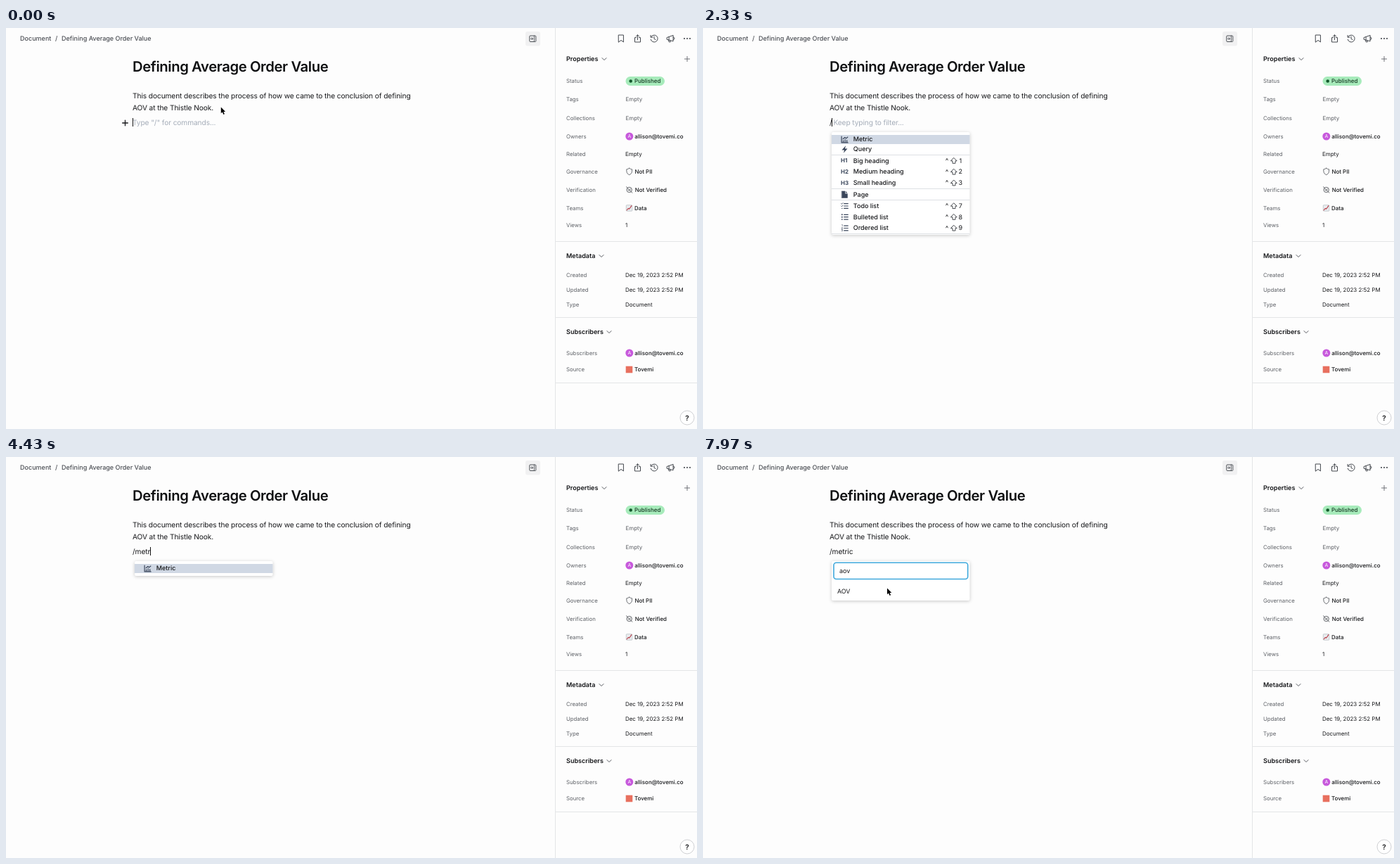
An HTML page with a canvas for the animation above (8 s loop, 983x570 px).

```html
<!DOCTYPE html>
<html lang="en">
<head>
<meta charset="utf-8">
<title>Document editor</title>
<style>
  html, body { margin: 0; width: 100%; height: 100%; overflow: hidden; background: #fdfdfd; }
  canvas { display: block; width: 983px; height: 570px; }
</style>
</head>
<body>
<canvas id="stage"></canvas>
<script>
const W = 983, H = 570, LOOP = 8000;
const canvas = document.getElementById('stage');
const ratio = window.devicePixelRatio || 1;
canvas.width = W * ratio;
canvas.height = H * ratio;
const ctx = canvas.getContext('2d');

const INK = '#17181b', GREY = '#5d6066', FAINT = '#a5adb9', ICON = '#39455a', LINE = '#e4e5e7';
const BODY = 10.2, BODY_GAP = -0.105;
const EMAIL = 'allison@tovemi.co';

// Drawing helpers

// y is the middle of the capital letters
function text(s, x, y, size, { weight = 400, color = INK, gap = 0, align = 'left' } = {}) {
  ctx.font = `${weight} ${size}px Inter, sans-serif`;
  ctx.textRendering = 'geometricPrecision';
  ctx.letterSpacing = gap + 'px';
  ctx.textAlign = align;
  ctx.fillStyle = color;
  ctx.fillText(s, x, y + size * 0.33);
  return ctx.measureText(s).width;
}

const body = (s, x, y, color) => text(s, x, y, BODY, { gap: BODY_GAP, color });

function rect(x, y, w, h, color) {
  ctx.fillStyle = color;
  ctx.fillRect(x, y, w, h);
}

function round(x, y, w, h, r, fill, stroke, width = 1) {
  ctx.beginPath();
  ctx.roundRect(x, y, w, h, r);
  paint(fill, stroke, width);
}

function disc(x, y, r, fill, stroke, width = 1) {
  ctx.beginPath();
  ctx.arc(x, y, r, 0, Math.PI * 2);
  paint(fill, stroke, width);
}

function paint(fill, stroke, width) {
  if (fill) { ctx.fillStyle = fill; ctx.fill(); }
  if (stroke) { ctx.strokeStyle = stroke; ctx.lineWidth = width; ctx.stroke(); }
}

// Path data relative to (x, y)
function path(x, y, d, { fill, stroke, width = 1 } = {}) {
  ctx.save();
  ctx.translate(x, y);
  ctx.lineCap = ctx.lineJoin = 'round';
  const p = new Path2D(d);
  if (stroke) { ctx.strokeStyle = stroke; ctx.lineWidth = width; ctx.stroke(p); }
  if (fill) { ctx.fillStyle = fill; ctx.fill(p); }
  ctx.restore();
}

// Sidebar

function heading(s, y, chevronX) {
  text(s, 797, y, 9.05, { weight: 600 });
  path(chevronX, y, 'M-3 -1.4L0 1.6L3 -1.4', { stroke: '#55585e' });
}

const label = (s, y) => text(s, 797, y, 7.8, { color: GREY });
const value = (s, x, y, weight = 400, color = INK) => text(s, x, y, 7.95, { weight, color });

function person(y) {
  disc(886.8, y, 5.5, '#c759dc');
  text('A', 886.8, y, 6.8, { color: '#fff', align: 'center' });
  value(EMAIL, 894.3, y, 500);
}

function toolbar() {
  round(739, 5, 21, 20.5, 3, '#f1f1f2');
  round(744.8, 11, 9, 8.5, 1, null, '#4c5056');
  path(749, 15, 'M2.4 -4V4.4M-2.6 .2H.4M-1 -1.4L.6 .2L-1 1.8', { stroke: '#4c5056', width: 0.9 });

  const pen = { stroke: '#43474d' };
  path(875, 15, 'M-3.4 -5H3.4V5L0 2.4L-3.4 5Z', pen);
  path(898.5, 15, 'M-2 -1.4H-4V5H4V-1.4H2M0 1.8V-5M-2.2 -3L0 -5.2L2.2 -3', pen);
  path(922, 15, 'M-4.4 -2.2A5 5 0 1 1 -4.8 1.2M-4.9 -4.6V-1.8H-2.1M0 -2.8V.4L2.2 1.6', pen);
  path(945.5, 15, 'M-5 -1.6L3.6 -4.6V3.8L-5 1.4ZM-3.2 2L-2.4 4.8H-.2L-.8 2.7M3.6 -2A1.8 1.8 0 0 1 3.6 1.6M-2.4 -2.4V2', pen);
  [-4, 0, 4].forEach(dx => disc(969 + dx, 15, 1.05, '#43474d'));
}

function sidebar() {
  rect(781, 0, 1, H, LINE);
  [303, 411, 504].forEach(y => rect(782, y, W - 782, 1, LINE));
  toolbar();

  heading('Properties', 44, 851);
  path(969, 44, 'M-3.6 0H3.6M0 -3.6V3.6', { stroke: '#62656b', width: 0.9 });
  const names = 'Status Tags Collections Owners Related Governance Verification Teams Views'.split(' ');
  const rows = [75.5, 101.5, 128, 154, 179, 204, 230, 256, 280];
  names.forEach((s, i) => label(s, rows[i]));

  round(881.5, 69, 55.5, 13, 6.5, '#a7ebbb');
  disc(888.7, 75.5, 2.3, '#14592c');
  value('Published', 894, 75.5, 500, '#173a24');
  value('Empty', 881.5, 101.5, 400, GREY);
  value('Empty', 881.5, 128, 400, GREY);
  person(154);
  value('Empty', 881, 179);
  path(886.7, 204, 'M0 -4.6C1.4 -3.6 2.6 -3.4 3.8 -3.2V-.4C3.8 2.2 2 3.8 0 4.7C-2 3.8 -3.8 2.2 -3.8 -.4V-3.2C-2.6 -3.4 -1.4 -3.6 0 -4.6Z', { stroke: '#55585e', width: 0.9 });
  value('Not PII', 894.5, 204, 500);
  disc(886.7, 230, 3.7, null, '#55585e', 0.9);
  path(886.7, 230, 'M-4.3 -4.3L4.3 4.3M-1.6 .2L-.4 1.4L1.8 -1.2', { stroke: '#55585e', width: 0.9 });
  value('Not Verified', 894.8, 230, 500);
  round(882.3, 251.7, 8.5, 8.5, 0.8, '#e9edf0', '#a9b0b6', 0.6);
  path(886.5, 256, 'M-3.4 3L-1.2 .4L.2 1.2L3.4 -3.4', { stroke: '#b63a45', width: 1.1 });
  value('Data', 894, 256, 500);
  value('1', 881, 280);

  heading('Metadata', 324, 847);
  label('Created', 351);
  label('Updated', 372);
  label('Type', 393);
  value('Dec 19, 2023 2:52 PM', 881, 351);
  value('Dec 19, 2023 2:52 PM', 881, 372);
  value('Document', 881, 393);

  heading('Subscribers', 432, 858);
  label('Subscribers', 462);
  person(462);
  label('Source', 485.5);
  round(881.7, 480.7, 9.6, 9.6, 0, '#e8705f');
  value('Tovemi', 894, 485.5, 500);

  disc(969, 554, 10, '#fff', '#cfd0d3');
  text('?', 969, 554.3, 10, { weight: 600, align: 'center' });
}

// Document area

function page() {
  const crumb = { weight: 500, color: '#4b4e54' };
  text('Document', 20, 15, 9.03, crumb);
  text('/', 70, 15, 9.03, crumb);
  text('Defining Average Order Value', 79, 15, 9.03, crumb);
  text('Defining Average Order Value', 180, 55.2, 20.3, { weight: 600, gap: -0.42, color: '#0f1012' });
  body('This document describes the process of how we came to the conclusion of defining', 180, 96.3);
  body('AOV at the Thistle Nook.', 180, 113.3);
}

function panel(bottom) {
  ctx.save();
  ctx.shadowColor = 'rgba(0,0,0,.22)';
  ctx.shadowBlur = 5 * ratio;
  ctx.shadowOffsetY = 1 * ratio;
  round(183, 148, 196.5, bottom - 148, 2, '#fff');
  ctx.restore();
}

const stroke = { stroke: ICON, width: 1.2 };
const icons = {
  metric(y) { path(201.5, y, 'M-4.4 -4.4V4.4H4.6M-2 4V1.4M.6 4V0M3.2 4V1M-2.4 -.8L.4 -3L2 -1.6L4.4 -3.4', stroke); },
  bolt(y) { path(201.5, y, 'M1.6 -5.2L-4 1H-.4L-1.6 5.2L4 -1H.4Z', { fill: ICON }); },
  page(y) {
    path(201.5, y, 'M-4 -4.8H.6V-1H4V4.8H-4Z', { fill: ICON, stroke: ICON, width: 0.5 });
    path(201.5, y, 'M1.6 -4.8L4 -2.2H1.6Z', { fill: ICON });
  },
  clip(y) { path(201.5, y, 'M2.8 -2.4V2.2A2.7 2.7 0 0 1 -2.8 2.2V-3A1.8 1.8 0 0 1 .9 -3V1.8A.8 .8 0 0 1 -.9 1.8V-1.8', stroke); },
  image(y) {
    round(196.8, y - 4, 9.4, 8, 1, ICON);
    path(201.5, y, 'M-3.4 2.4L-1.2 -.2L.2 1.2L1.6 -.8L3.6 2.4Z', { fill: '#fff' });
  },
  info(y) {
    disc(201.5, y, 5, ICON);
    path(201.5, y, 'M0 -.4V2.4M0 -2.4V-2.3', { stroke: '#fff', width: 1.2 });
  },
  globe(y) {
    disc(201.5, y, 4.6, null, ICON, 1.1);
    path(201.5, y, 'M-4.2 -1.8L-1 -.6L-.4 1.6L1.4 2.4L.2 4.6C-3 4 -4.6 1.6 -4.2 -1.8ZM-1.6 -4.2L.4 -2L2.8 -1.8L3.4 -3.2C1.8 -4.6 0 -4.8 -1.6 -4.2Z', { fill: ICON });
  },
  list(y, mark) {
    [-3.4, 0, 3.4].forEach((dy, i) => {
      path(201.5, y + dy, 'M-.8 0H4.8', stroke);
      mark(y + dy, i);
    });
  },
  todo(y) {
    icons.list(y, (v, i) => path(197.8, v, i < 2 ? 'M-1.2 0L-.4 .8L1.2 -.9' : 'M-.4 0H.4', { stroke: ICON, width: 0.9 }));
  },
  bullets(y) { icons.list(y, v => disc(197.8, v, 0.95, ICON)); },
  ordered(y) { icons.list(y, (v, i) => text(String(i + 1), 197.8, v, 4, { weight: 600, color: ICON, align: 'center' })); },
  brand(y) { disc(202, y, 4.6, '#18c39a'); }
};

const FULL = [
  ['metric', 'Metric', 158.5], ['bolt', 'Query', 172.5],
  ['H1', 'Big heading', 188.7, 1], ['H2', 'Medium heading', 204.5, 2], ['H3', 'Small heading', 220.3, 3],
  ['page', 'Page', 236.7],
  ['todo', 'Todo list', 253, 7], ['bullets', 'Bulleted list', 268.7, 8], ['ordered', 'Ordered list', 284.5, 9]
];
const FILTERED = [
  ['metric', 'Metric', 158.5], ['H2', 'Medium heading', 173, 2], ['H3', 'Small heading', 188.7, 3],
  ['page', 'Page', 205], ['clip', 'File attachment', 221], ['image', 'Image', 236.7],
  ['info', 'Info notice', 253], ['globe', 'Generic Embed', 269.3], ['brand', 'Domuva', 285.8]
];

function menu(items, rules, bottom) {
  panel(bottom);
  rect(183, 152, 196.5, 13, '#d0d8e4');
  rules.forEach(y => rect(183, y, 196.5, 1, '#dde0e4'));
  for (const [icon, name, y, key] of items) {
    if (icons[icon]) icons[icon](y);
    else text(icon, 196, y, 8, { weight: 700, color: ICON });
    text(name, icon === 'brand' ? 215 : 213.8, y, 9, { weight: 500 });
    if (!key) continue;
    text('^', 347, y, 9.5, { align: 'center' });
    path(357, y, 'M0 -4L4.2 .2H2V3.6H-2V.2H-4.2Z', { stroke: '#33363b', width: 0.9 });
    text(String(key), 366.3, y, 9, { align: 'center' });
  }
}

function slashMenu(typed) {
  if (typed === '/') menu(FULL, [180, 228, 244, 292], 294);
  else if (typed === '/m') menu(FILTERED, [196, 244, 261], 294);
  else if (typed === '/me') menu(FILTERED.slice(0, 2), [], 182);
  else menu(FILTERED.slice(0, 1), [], 169);
}

// Timeline

const KEYS = [[30, ''], [2030, '/'], [2830, '/m'], [4200, '/me'], [4290, '/met'], [4400, '/metr'], [4570, '/metri'], [4870, '/metric']];
const QUERY = [[5230, ''], [6530, 'a'], [6830, 'ao'], [7010, 'aov']];
const OPEN = 5000, FOCUS = 5270, RESULTS = 5370;

const latest = (steps, t) => steps.filter(s => s[0] <= t).pop() || steps[0];
const blinkOn = age => age < 0 || age % 1000 < 500;
const caret = (x, y) => rect(Math.floor(x), y, 1, 12, '#111');

function search(t) {
  const focused = t >= FOCUS;
  const [since, query] = latest(QUERY, t);
  panel(t < RESULTS ? 183 : query ? 204 : 225);
  round(186, 150.3, 190.7, 23.2, 3.5, '#fff', focused ? '#40a9dc' : '#cdd0d5', focused ? 1.6 : 1);
  const w = query ? text(query, 194, 162, 9) : 0;
  if (!query) text('Search...', 194, 162, 8.8, { color: '#7d8187' });
  if (focused && blinkOn(t - since)) caret(194 + w, 156);
  if (t >= RESULTS) text('AOV', 191, 190.7, 8.9);
}

function editor(t) {
  const [since, typed] = latest(KEYS, t);
  let w = 0;
  if (typed) {
    w = body(typed, 180, 134.7);
    if (typed === '/') body('Keep typing to filter...', 185.4, 134.7, FAINT);
  } else {
    path(169.5, 135, 'M-3.8 0H3.8M0 -3.8V3.8', { stroke: INK, width: 1.3 });
    body('Type "/" for commands...', 180, 134.7, FAINT);
  }
  if (t < FOCUS && blinkOn(t - since)) caret(180 + w, 128);
  if (t >= OPEN) search(t);
  else if (typed) slashMenu(typed);
}

function pointer(t) {
  const [start, end, a, b] = t < 2030
    ? [30, 1370, [305.8, 112.4], [274.5, 133.8]]
    : [7470, 7970, [274.5, 133.8], [262, 186.4]];
  if (t >= 2030 && t < start) return;
  const k = Math.min(1, Math.max(0, (t - start) / (end - start)));
  const e = k * k * (3 - 2 * k);
  path(a[0] + (b[0] - a[0]) * e, a[1] + (b[1] - a[1]) * e,
    'M0 0V8.9L2 7L3.6 10.5L5.1 9.9L3.6 6.5H6.3Z', { fill: '#000', stroke: '#fff' });
}

function draw(now) {
  const t = now % LOOP;
  ctx.setTransform(ratio, 0, 0, ratio, 0, 0);
  rect(0, 0, W, H, '#fdfdfd');
  page();
  sidebar();
  editor(t);
  pointer(t);
}

let begin;
function tick(now) {
  begin ??= now;
  draw(now - begin);
  requestAnimationFrame(tick);
}
requestAnimationFrame(tick);
</script>
</body>
</html>
```
